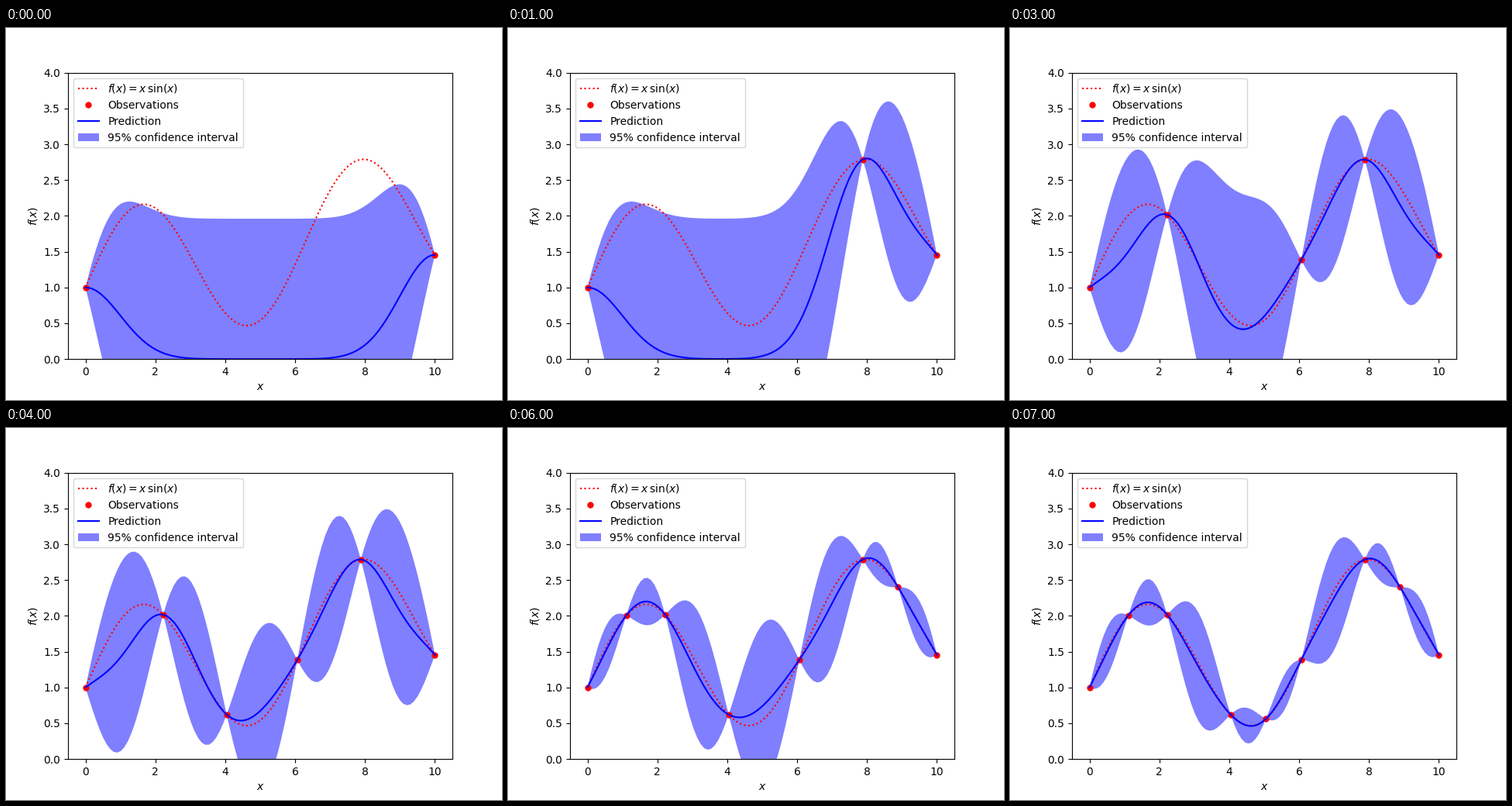
A matplotlib script that plays this animation: 640 by 480 pixels, repeating every 8000 ms.

```python
import numpy as np
import matplotlib.pyplot as plt
from matplotlib.animation import FuncAnimation

GRID = np.linspace(0, 10, 100)
START = [0, 99]                          # grid indices known at the beginning
SAMPLES = [78, 60, 22, 40, 88, 11, 50]   # one more is observed per step


def truth(x):
    return np.sin(x) + 0.1 * x + 1


def kernel(a, b):
    return np.exp(-0.5 * (a[:, None] - b[None, :]) ** 2)


def predict(obs):
    """Posterior mean and standard deviation of a unit RBF process."""
    cov = kernel(obs, obs) + 1e-10 * np.eye(len(obs))
    cross = kernel(GRID, obs)
    weights = np.linalg.solve(cov, cross.T)
    var = 1 - np.sum(cross * weights.T, axis=1)
    return weights.T @ truth(obs), np.sqrt(np.maximum(var, 0))


def band(mean, std):
    edge = np.concatenate([mean - 1.96 * std, (mean + 1.96 * std)[::-1]])
    return np.column_stack([np.concatenate([GRID, GRID[::-1]]), edge])


fig, ax = plt.subplots(figsize=(6.4, 4.8), dpi=100)
ax.plot(GRID, truth(GRID), "r:", label=r"$f(x) = x\,\sin(x)$")
dots, = ax.plot([], [], "r.", markersize=10, label="Observations")
line, = ax.plot([], [], "b-", label="Prediction")
area, = ax.fill([0, 10, 10], [0, 0, 1], alpha=0.5, fc="b", ec="None",
                label="95% confidence interval")
ax.set(xlim=(-0.5, 10.5), ylim=(0, 4), xlabel="$x$", ylabel="$f(x)$")
ax.legend(loc="upper left")


def update(step):
    obs = GRID[START + SAMPLES[:step]]
    mean, std = predict(obs)
    dots.set_data(obs, truth(obs))
    line.set_data(GRID, mean)
    area.set_xy(band(mean, std))
    return dots, line, area


anim = FuncAnimation(fig, update, frames=len(SAMPLES) + 1, interval=1000,
                     repeat=True, repeat_delay=0, blit=False)
plt.show()
```
